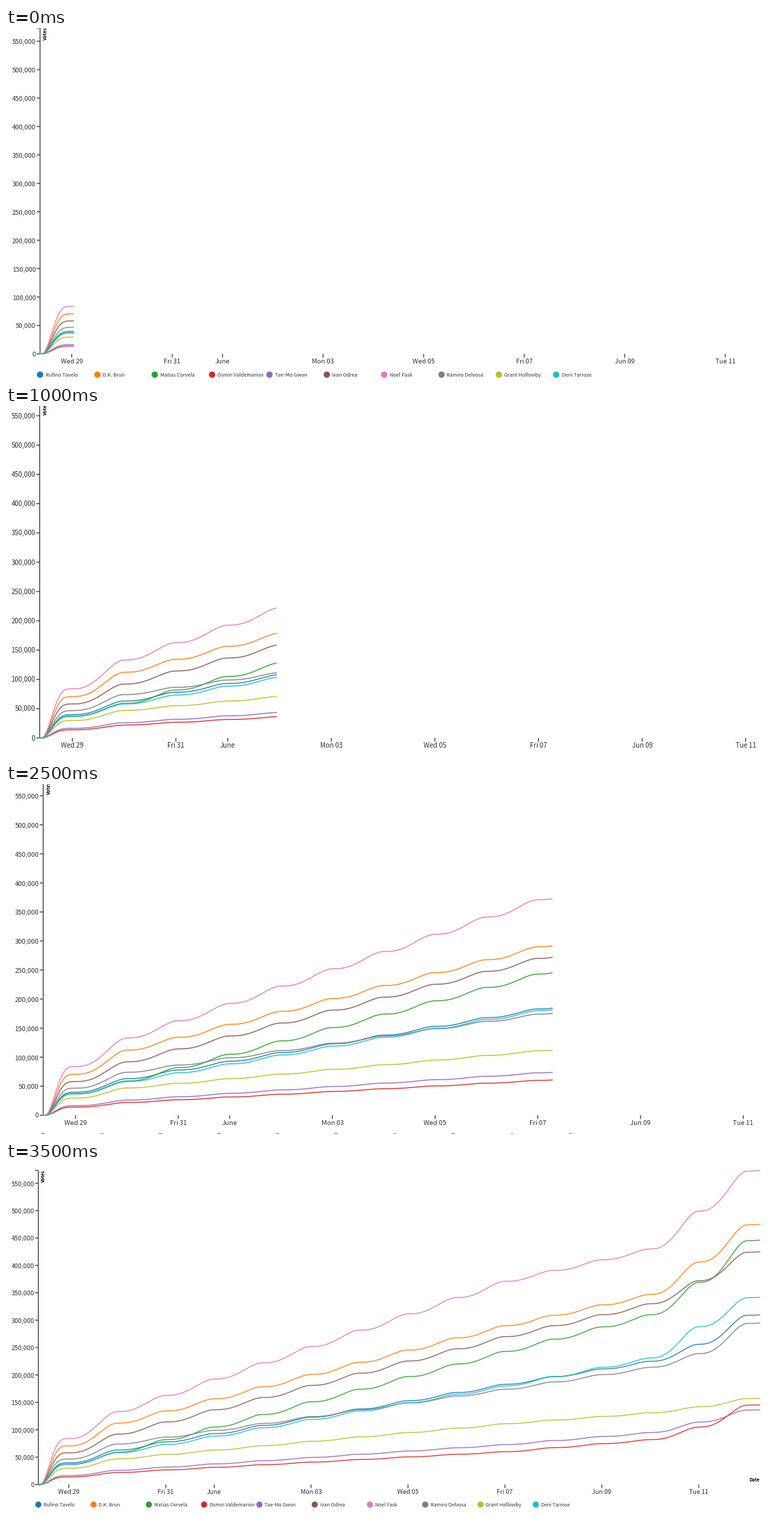
A matplotlib script that plays this animation: 1111 by 504 pixels, repeating every 4000 ms.

```python
import numpy as np
import matplotlib.pyplot as plt
from matplotlib.animation import FuncAnimation

W, H, DPI = 1111, 504, 100
PX = 72 / DPI
FONT = "Noto Sans CJK JP"
INK = "#333333"
START, STOP = -0.63, 14.26  # days relative to Wed 29
BASE_DAY = 69.73  # pixels per day at zoom 1

# Thousands of votes after days 1, 9, 12, 13 and 14
SERIES = [
    ("Rufino Tavelo", "#1f77b4", (63, 183, 225, 256, 309)),
    ("D.K. Brun", "#ff7f0e", (112, 290, 347, 406, 474)),
    ("Matias Corvela", "#2ca02c", (59, 243, 310, 369, 445)),
    ("Osmin Valdemarion", "#d62728", (22, 60, 82, 105, 145)),
    ("Tae-Mo Gwon", "#9467bd", (26, 73, 95, 114, 136)),
    ("Ivan Odrea", "#8c564b", (92, 270, 330, 372, 424)),
    ("Noel Fask", "#e377c2", (133, 371, 430, 499, 572)),
    ("Ramiro Delvosa", "#7f7f7f", (74, 174, 214, 239, 294)),
    ("Grant Hollowby", "#bcbd22", (47, 111, 131, 142, 157)),
    ("Deni Tarrose", "#17becf", (58, 180, 231, 288, 341)),
]
KEY_DAYS = (-1, 0, 1, 9, 12, 13, 14, 15)

# Camera per step: axis x, baseline y, pixels per day, last day drawn
VIEWS = [
    (49, 469.3, 72.35, 0.035),
    (48.5, 475, 74, 2),
    (48.5, 478, 74.54, 3.94),
    (53, 480, 75.54, 5.6),
    (54.5, 480.5, 75.12, 7.22),
    (53.5, 477, 73.92, 9.28),
    (51, 471.7, 72.5, 11.42),
    (46.5, 464.5, BASE_DAY, STOP),
]


def smooth(u):
    u = np.clip(u, 0, 1)
    return u * u * (3 - 2 * u)


def voting_time(t):
    """Warp days so that votes pause each night and surge by day."""
    day = np.floor(t)
    usual = smooth((t - day) ** 1.3)
    opening = 1 - (1 - smooth(1 + t / 0.59)) ** 2
    return day + np.where(t < 0, opening, usual)


def votes(keys, t):
    first, last = keys[0], keys[-1]
    levels = (0, 0.63 * first, *keys, 1.03 * last)
    return np.interp(voting_time(t), KEY_DAYS, levels)


TOP = max(votes(keys, STOP) for _, _, keys in SERIES)

fig = plt.figure(figsize=(W / DPI, H / DPI), dpi=DPI, facecolor="white")
ax = fig.add_axes([0, 0, 1, 1])


def date_ticks():
    yield 0, "Wed 29"
    yield 2, "Fri 31"
    yield 3, "June"
    for k, name in enumerate(("Mon 03", "Wed 05", "Fri 07", "Jun 09", "Tue 11")):
        yield 5 + 2 * k, name


def draw(step):
    left, base, day, end = VIEWS[step]
    zoom = day / BASE_DAY
    unit = 0.5658 * day / 50  # pixels per thousand votes
    wed = left - START * day

    ax.clear()
    ax.set_xlim(0, W)
    ax.set_ylim(H, 0)
    ax.axis("off")

    def label(x, y, s, size, **kw):
        ax.text(x, y, s, fontsize=size * zoom * PX, family=FONT,
                va="baseline", clip_on=True, **kw)

    def rule(xs, ys):
        ax.plot(xs, ys, color=INK, lw=1.2 * PX, snap=False,
                solid_capstyle="butt")

    # Axes
    top = base - TOP * unit
    tick = 4.6 * zoom
    rule([left, left], [base, top])
    rule([left - tick, left], [top, top])
    for k in range(0, 551, 50):
        y = base - k * unit
        rule([left - tick, left], [y, y])
        label(left - 5.8 * zoom, y + 3.3 * zoom, f"{k * 1000:,}", 9.05,
              ha="right", color=INK)
    for d, name in date_ticks():
        x = wed + d * day
        rule([x, x], [base, base + 5 * zoom])
        label(x, base + 13.4 * zoom, name, 9.05, ha="center", color=INK)

    bold = dict(ha="right", color="black", weight="bold")
    label(left + 9.6 * zoom, top, "Votes", 6.6, rotation=90,
          rotation_mode="anchor", **bold)
    right = wed + STOP * day
    if right < W:
        label(right, base - 5 * zoom, "Date", 6.6, **bold)

    # Lines and legend
    t = np.linspace(START, end, 900)
    y = base + 28.8 * zoom
    for k, (name, color, keys) in enumerate(SERIES):
        ax.plot(wed + t * day, base - votes(keys, t) * unit,
                color=color, lw=1.35 * zoom * PX, alpha=0.9)
        x = left + k * 79.55 * zoom
        ax.add_patch(plt.Circle((x, y), 4.4 * zoom, color=color, lw=0))
        label(x + 7.4 * zoom, y + 2.5 * zoom, name, 7.05, ha="left", color=INK)
    return []


anim = FuncAnimation(fig, draw, frames=len(VIEWS), interval=500,
                     init_func=lambda: [], repeat=True, repeat_delay=0)
plt.show()
```
